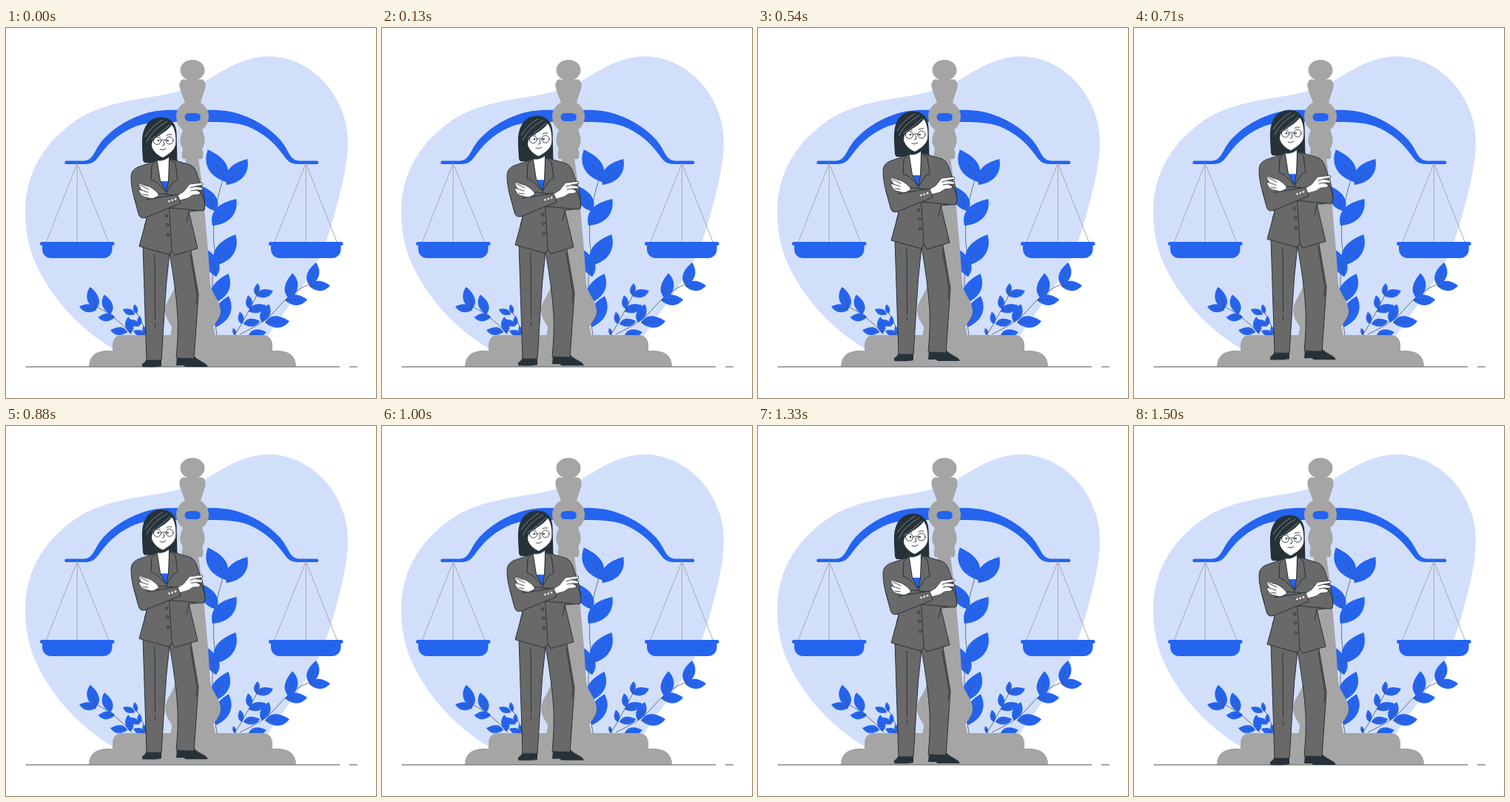
An HTML page without scripts that plays this animation: 500x500 px, repeating every 1.54 s.

```html
<!DOCTYPE html>
<html lang="en">
<head>
<meta charset="utf-8">
<title>Lawyer and scales</title>
<style>
  html, body { margin: 0; width: 100%; height: 100%; overflow: hidden; background: #fff; }
  svg { display: block; width: 100%; height: 100%; }
  .blue { fill: #2464ef; }
  .stone { fill: #a5a5a5; }
  .thread { fill: none; stroke: #a8a8a8; }
  .stem { fill: none; stroke: #4a5568; stroke-width: .8; }
  .dark { fill: #263238; }
  .line { fill: none; stroke: #263238; stroke-width: .9; stroke-linecap: round; stroke-linejoin: round; }
  .suit, .skin { stroke: #263238; stroke-linejoin: round; }
  .suit { fill: #696969; }
  .skin { fill: #fff; stroke-width: .8; }
  #woman { animation: bob 1540ms linear infinite; }
  @keyframes bob {
    0%, 97.5%, 100% { transform: translateY(0); }
    24.7% { transform: translateY(-5.4px); }
    35% { transform: translateY(-8px); }
    45% { transform: translateY(-10px); }
    65% { transform: translateY(-6.3px); }
    76% { transform: translateY(-4.1px); }
  }
</style>
</head>
<body>
<svg viewBox="0 0 500 500">
  <defs>
    <g id="leaf">
      <path class="blue" d="M0 0C-15-10-17-27 0-50C15-37 17-18 0 0Z"/>
      <path class="stem" d="M0 0Q-2-14 0-30" vector-effect="non-scaling-stroke"/>
    </g>
    <g id="scale">
      <path class="blue" d="M235 111C212 110 198 112 184 117C160 125 142 139 131 151C119 165 118 179.500 105 179.500H81.500a2.300 2.300 0 0 0 0 4.600H106C119 184 122 178 128 170C140 154 155 141 175 133C191 127 212 127 235 127Z"/>
      <path class="thread" d="M96.200 183L54 290M96.200 183V290M96.200 183L139 290"/>
      <rect class="blue" x="46" y="289" width="100.500" height="5" rx="2.500"/>
      <path class="blue" d="M49 291H143.500V299a12 12 0 0 1-12 12H61a12 12 0 0 1-12-12Z"/>
    </g>
  </defs>

  <path fill="#d2dffb" d="M144 433C104 409 75 378 55 346C35 314 26 285 26 248C26 203 45 160 93 126C130 101 170 98 215 90C270 79 280 62 310 49C330 40 345 38 358 38.500C415 40 463 95 462 156C461 190 452 222 443 255C435 285 425 312 408 338C390 366 372 390 352 418V440H150Z"/>

  <g id="plants">
    <path class="stem" d="M285 415Q274 360 282 300Q275 255 298 190M190 415Q186 400 174 380M170 414Q145 386 117 374M316 414Q350 398 362 384Q385 355 413 345M309 415Q325 390 341 357"/>
    <use href="#leaf" transform="translate(297 208) rotate(-29) scale(-1 1)"/>
    <use href="#leaf" transform="translate(298 212) rotate(39) scale(.9)"/>
    <use href="#leaf" transform="translate(284 248) rotate(-30) scale(-.8 .8)"/>
    <use href="#leaf" transform="translate(279 267) rotate(42) scale(.97)"/>
    <use href="#leaf" transform="translate(284 336) rotate(-18) scale(-.76 .76)"/>
    <use href="#leaf" transform="translate(283 321) rotate(33)"/>
    <use href="#leaf" transform="translate(280 372) rotate(27) scale(.9)"/>
    <use href="#leaf" transform="translate(284 404) rotate(22) scale(.9)"/>

    <use href="#leaf" transform="translate(121 381) rotate(-13) scale(-.64 .64)"/>
    <use href="#leaf" transform="translate(122 381) rotate(-78) scale(-.47 .47)"/>
    <use href="#leaf" transform="translate(141 387) rotate(-17) scale(-.56 .56)"/>
    <use href="#leaf" transform="translate(147 391) rotate(-90) scale(-.45 .45)"/>
    <use href="#leaf" transform="translate(168 413) rotate(-7) scale(-.46 .46)"/>
    <use href="#leaf" transform="translate(164 411) rotate(-83) scale(-.46 .46)"/>
    <use href="#leaf" transform="translate(176 386) rotate(-9) scale(-.26 .26)"/>
    <use href="#leaf" transform="translate(174 387) rotate(-66) scale(-.35 .35)"/>
    <use href="#leaf" transform="translate(180 402) rotate(4) scale(-.26 .26)"/>
    <use href="#leaf" transform="translate(180 403) rotate(-59) scale(-.35 .35)"/>
    <use href="#leaf" transform="translate(189 415) rotate(-14) scale(-.25 .25)"/>
    <use href="#leaf" transform="translate(188 415) rotate(-69) scale(-.34 .34)"/>

    <use href="#leaf" transform="translate(411 349) rotate(14) scale(.66)"/>
    <use href="#leaf" transform="translate(410 349) rotate(88) scale(.56)"/>
    <use href="#leaf" transform="translate(384 367) rotate(5) scale(.72)"/>
    <use href="#leaf" transform="translate(377 368) rotate(88) scale(.6)"/>
    <use href="#leaf" transform="translate(346 398) rotate(20) scale(.53)"/>
    <use href="#leaf" transform="translate(350 398) rotate(87) scale(.66)"/>
    <use href="#leaf" transform="translate(338 361) rotate(7) scale(.32)"/>
    <use href="#leaf" transform="translate(338 362) rotate(73) scale(.48)"/>
    <use href="#leaf" transform="translate(330 380) rotate(-9) scale(.38)"/>
    <use href="#leaf" transform="translate(328 383) rotate(71) scale(.5)"/>
    <use href="#leaf" transform="translate(319 400) rotate(-11) scale(.33)"/>
    <use href="#leaf" transform="translate(321 400) rotate(80) scale(.45)"/>
    <use href="#leaf" transform="translate(310 415) rotate(-18) scale(.2)"/>
    <use href="#leaf" transform="translate(328 415) rotate(80) scale(.48)"/>
  </g>

  <g id="balance">
    <use href="#scale"/>
    <use href="#scale" transform="matrix(-1 0 0 1 501.500 0)"/>
    <g class="stone">
      <ellipse cx="252" cy="57" rx="16.500" ry="14"/>
      <path d="M238 69.500H266C271 74 270 81 268 85L263 101H242L236 85C234 79 233 74 238 69.500Z"/>
      <circle cx="252" cy="120" r="22"/>
      <path d="M240 136H264C267 142 270 150 268 157L265 164Q268 170 265 177H239Q236 170 239 164L236 157C234 150 237 142 240 136Z"/>
      <path d="M243 176H260L266 220L273 300L276 345C279 362 290 368 290 383C289 396 278 401 281 406L283 416H222L224 406C225 401 216 396 215 383C215 368 226 362 229 345L232 300Z"/>
      <path d="M144 436V428Q145 415 158 415H346Q359 415 360 428V436Q392 434 392 458H112Q112 434 144 436Z"/>
    </g>
    <rect class="blue" x="241.500" y="115" width="21.500" height="11" rx="5.500"/>
  </g>
  <path d="M26.500 457.800H451M464 457.800H475" stroke="#70767a" stroke-width="1.300"/>

  <g id="woman">
    <g id="legs">
      <path class="dark" d="M184 458V454Q188 452 190 447H210V457Q202 459 184 458Z"/>
      <path class="dark" d="M231 444L230 456H240L243 458H272.500C273 453 262 451 255 444Z"/>
      <path class="suit" d="M185 294L190 449H210L214 385Q216 345 221 304Q230 355 232 390Q233 415 230 446L254 447L260 360L249 296Z"/>
      <path class="line" d="M201 306L201.500 394M201.500 399V404M249 306L258 360L257 373"/>
    </g>

    <path class="dark" d="M185 179C184 160 182 145 188 134C194 122 206 119 215 121C226 124 230 132 230.500 142L231.500 182H187Z"/>

    <g id="jacket">
      <path class="suit" d="M204 179L178 188Q169 192 169 201C169 220 175 235 179 248L190 258L180 295L220 306L224 301L228 307L259 298L247 248L268 246Q270 238 266 220L257 194Q255 188 249 185L222 177Z"/>
      <path class="skin" stroke="none" d="M203 166H220.500L220 210H208L204 183Z"/>
      <path class="blue" d="M208 207H220L217 222Z"/>
      <path class="suit" d="M204 178L197 185L196 205L203 208L217 222L208.500 207Z"/>
      <path class="suit" d="M221 177L229 183L232 205L226 208L217 222L219.500 207Z"/>
      <path class="line" d="M217 222L221 249L224 301M190 258L187 268M247 248L244 262"/>
      <g class="line">
        <circle cx="217" cy="254" r="1.800"/>
        <circle cx="218" cy="266" r="1.800"/>
        <circle cx="219" cy="279.500" r="1.800"/>
      </g>
    </g>

    <g id="arms">
      <path class="suit" d="M199 223L221 243L266 247Q271 244 267 230L262 220L240 227Z"/>
      <path class="skin" d="M206 227L198 231L186 228Q182 226 180 221L179 218L183 219L179 212L181 210L189 213Q197 214 206 224Z"/>
      <path class="line" d="M183 219L192 222M181 212L193 218M185 225L192 226"/>
      <path class="suit" d="M173 228L179 251Q181 259 189 256L236 237L232 225L189 232"/>
      <path class="skin" d="M232 226L240 221L248 211L265 209L266 212L256 214L266 216L265 219L257 219L263 222L261 225L252 226L246 230L235 233Z"/>
      <path class="line" d="M256 214L249 216M257 219L250 220"/>
      <g fill="#fff">
        <circle cx="220.500" cy="234" r="1.300"/>
        <circle cx="224.700" cy="232.700" r="1.300"/>
        <circle cx="229" cy="231.300" r="1.300"/>
      </g>
    </g>

    <g id="head">
      <path class="dark" d="M202 167L212 174L221 168V174Q213 181 204 179Z"/>
      <path fill="#fff" d="M196 155C196 148 213 145 224 131C229 137 230 149 229 158C227 166 219 171 212 175C204 172 197 165 196 155Z"/>
      <path class="dark" d="M224 130C217 142 203 144 198 153L196 162L202 170L204 180H187L186 155L190 136L210 124Z"/>
      <path d="M188 147Q196 133 212 124M190 154Q198 137 218 126M196 151Q208 143 222 130" fill="none" stroke="#a3abb0" stroke-width=".7"/>
      <g class="line">
        <circle cx="204.500" cy="152.500" r="5"/>
        <circle cx="221" cy="152" r="5"/>
        <path d="M209.500 152Q212.500 150 216 151.500M199.500 152L195 151M202 146Q205 144 208 146M217 145Q220 143 224 144M213 153L214 158L211 159M208 164Q212 166 216 163"/>
      </g>
      <circle class="dark" cx="206" cy="152" r="1.300"/>
      <circle class="dark" cx="218.500" cy="152" r="1.300"/>
    </g>
  </g>
</svg>
</body>
</html>
```
